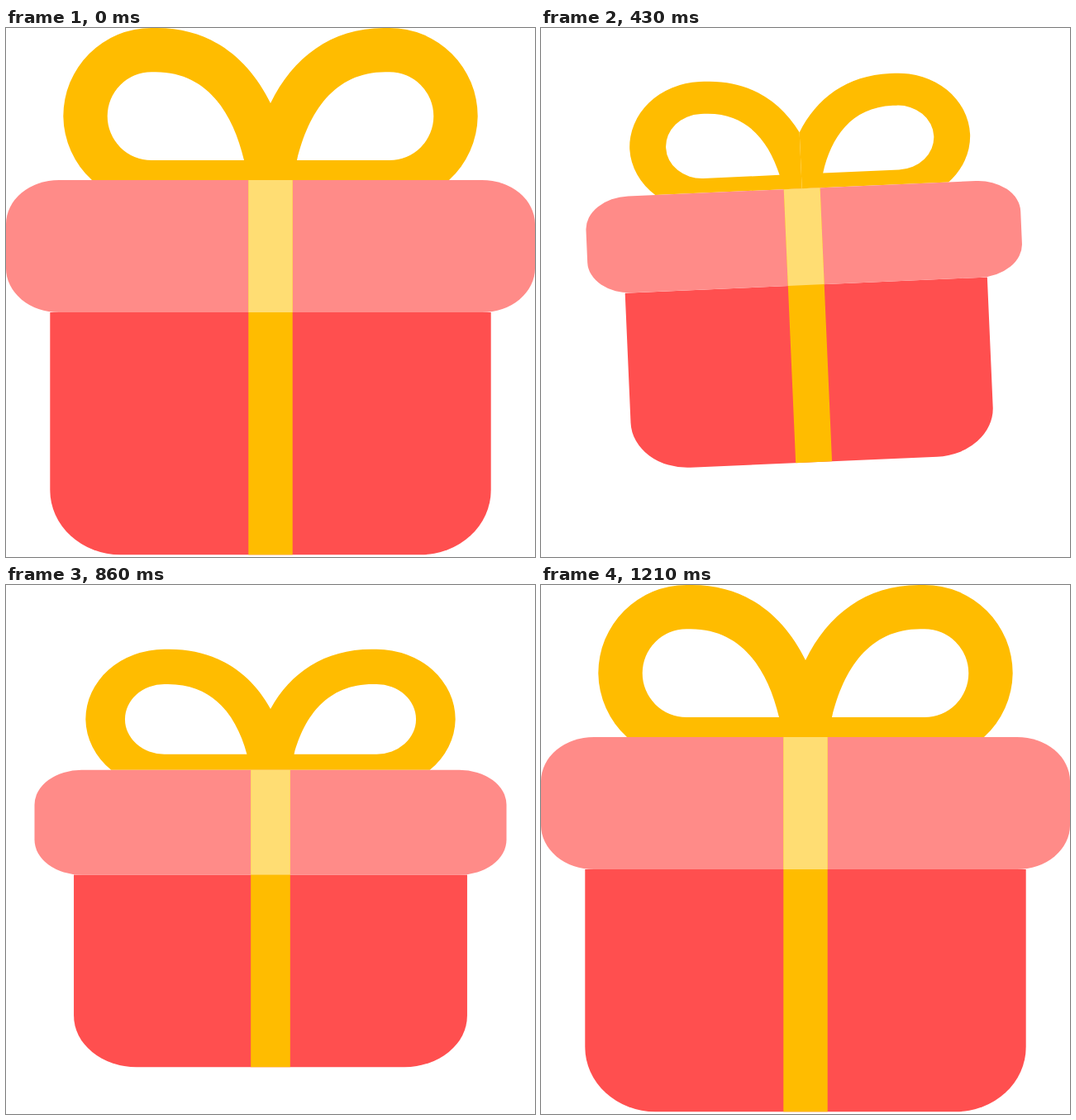
Write an HTML page that moves like this. It is 640x640 px and loops after 2370 ms.

```html
<!DOCTYPE html>
<html lang="en">
<head>
<meta charset="utf-8">
<title>Gift</title>
<style>
  html, body { margin: 0; width: 100%; height: 100%; overflow: hidden; background: #fff; }
  svg { display: block; width: 100%; height: 100%; }
</style>
</head>
<body>
<svg viewBox="0 0 640 640">
  <defs>
    <path id="loop" fill="#ffbc00" fill-rule="evenodd"
      d="M320 184H104A107 107 0 0 1 69.3 106.7A106.7 106.7 0 0 1 176 0H183C247 0 293 36 320 91Z
         M288 160H176A53.3 53.3 0 0 1 122.7 106.7A53.3 53.3 0 0 1 176 53.3H181C243 53.3 274 102 288 160Z"/>
  </defs>
  <g id="gift">
    <use href="#loop"/>
    <use href="#loop" transform="translate(640) scale(-1 1)"/>
    <path fill="#ff4f4f" d="M53.3 344H586.7V559A85 78.3 0 0 1 501.7 637.3H138.3A85 78.3 0 0 1 53.3 559Z"/>
    <rect fill="#ff8b88" y="184" width="640" height="160" rx="64" ry="53.3"/>
    <rect fill="#ffbc00" x="293.3" y="184" width="53.4" height="453.3"/>
    <rect fill="#ffdd73" x="293.3" y="184" width="53.4" height="160"/>
  </g>
</svg>
<script>
  const LOOP = 2370, LAST = 17, TAKEOFF = 2, LANDING = 14;
  const gift = document.getElementById('gift');

  const clamp = x => Math.min(1, Math.max(0, x));
  const mix = (a, b, f) => a + (b - a) * f;
  const smooth = x => (x = clamp(x), x * x * (3 - 2 * x));

  // The picture advances 14 times a second, on 10 ms ticks, then rests.
  function stepAt(t) {
    let n = LAST;
    while (Math.round(n / .14) * 10 > t) n--;
    return n;
  }

  // Crouch, jump with a short hang at the top, land and stand up again.
  function poseAt(n) {
    const crouch = smooth(Math.min(n / TAKEOFF, (LAST - n) / (LAST - LANDING)));
    const size = mix(.795, .9, smooth((n - TAKEOFF) / (LANDING - TAKEOFF)));
    const fall = clamp((Math.abs(n - 8) - .5) / 5.5);
    const swing = n - 8.5, side = Math.abs(swing);
    return {
      y: mix(320, mix(285, 400, fall * fall), crouch),
      sx: mix(1, size, crouch),
      sy: mix(1, size * 8 / 9, crouch),
      angle: 5 * Math.sign(swing) * clamp(Math.min(side / 1.5, (3.5 - side) / 2))
    };
  }

  const start = performance.now();
  function draw() {
    const t = (performance.now() - start) % LOOP;
    const { y, sx, sy, angle } = poseAt(stepAt(t));
    gift.setAttribute('transform',
      `translate(320 ${y}) rotate(${angle}) scale(${sx} ${sy}) translate(-320 -320)`);
    requestAnimationFrame(draw);
  }
  draw();
</script>
</body>
</html>
```
